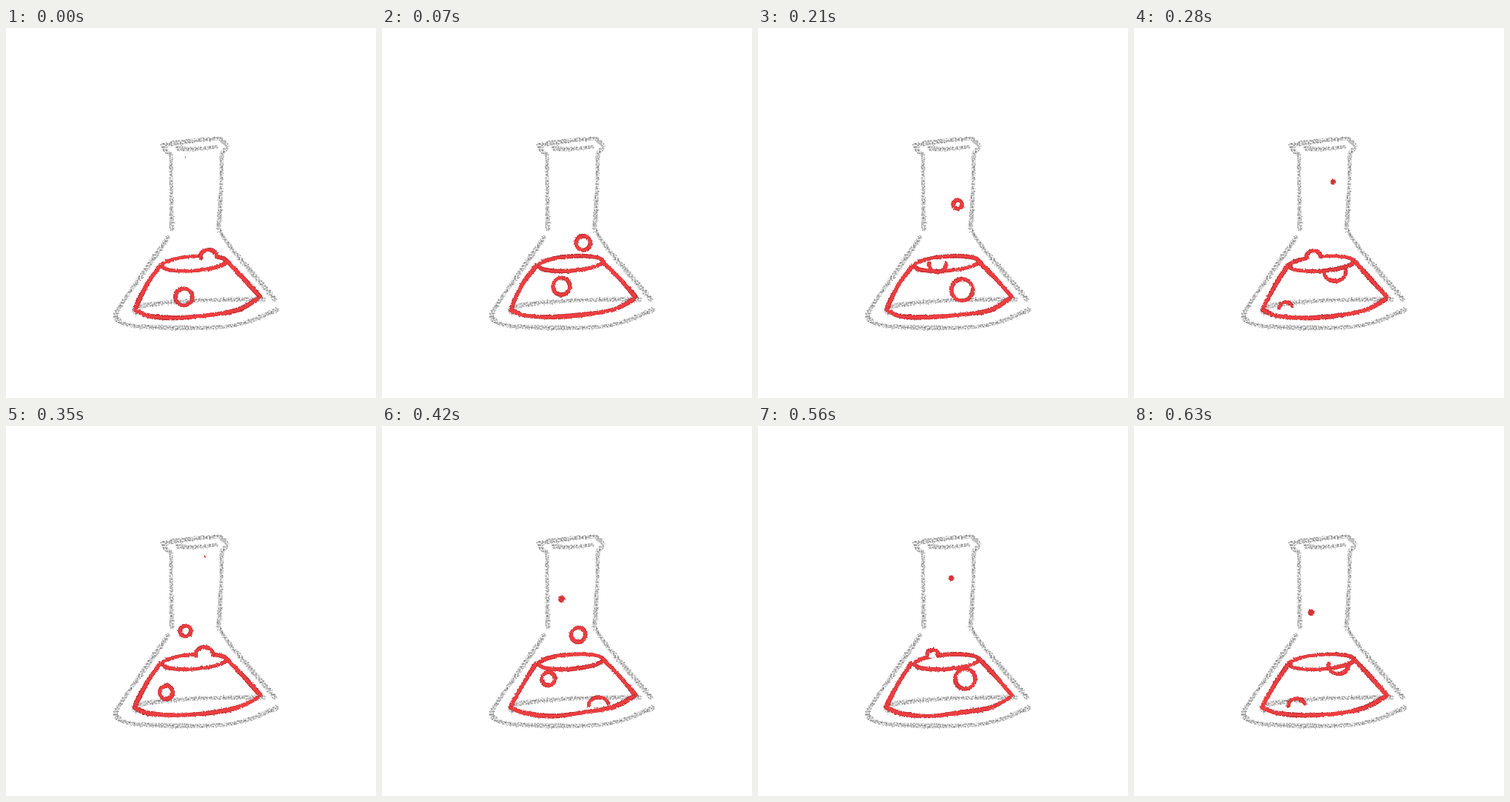
An HTML page that plays this animation: 480 by 480 pixels, repeating every 700 ms.

```html
<!DOCTYPE html>
<html lang="en">
<head>
<meta charset="utf-8">
<title>Bubbling flask</title>
<style>
  html, body { margin: 0; width: 100%; height: 100%; overflow: hidden; background: #fff; }
  svg { display: block; width: 100vw; height: 100vh; }
  path { fill: none; stroke-linecap: round; }
</style>
</head>
<body>
<svg viewBox="0 0 480 480">
  <defs>
    <filter id="pencil" filterUnits="userSpaceOnUse" x="130" y="130" width="235" height="270" color-interpolation-filters="sRGB">
      <feTurbulence type="fractalNoise" baseFrequency=".5" numOctaves="2" seed="4"/>
      <feColorMatrix values="1 0 0 0 0  0 1 0 0 0  0 0 1 0 0  0 0 0 0 1" result="noise"/>
      <feDisplacementMap in="SourceGraphic" in2="noise" scale="3.5" xChannelSelector="R" yChannelSelector="G" result="rough"/>
      <feColorMatrix in="noise" values="0 0 1.1 0 .22  0 0 1.1 0 .22  0 0 1.1 0 .22  0 0 0 0 1"/>
      <feComposite operator="in" in2="rough"/>
    </filter>
    <filter id="crayon" filterUnits="userSpaceOnUse" x="130" y="130" width="235" height="270" color-interpolation-filters="sRGB">
      <feTurbulence type="fractalNoise" baseFrequency=".45" numOctaves="2" seed="9"/>
      <feColorMatrix values="1 0 0 0 0  0 1 0 0 0  0 0 1 0 0  0 0 0 0 1" result="noise"/>
      <feDisplacementMap in="SourceGraphic" in2="noise" scale="3" xChannelSelector="R" yChannelSelector="G"/>
    </filter>
  </defs>
  <g id="glass" filter="url(#pencil)"></g>
  <g id="liquid" filter="url(#crayon)"></g>
</svg>
<script>
const STEP = 70, POSES = 10;
const SURFACE = 296, FLOOR = 363, RIM = 150;

let seed = 1;
const random = () => (seed = seed * 16807 % 2147483647) / 2147483647;
const jitter = size => (random() * 2 - 1) * size;
const lerp = (a, b, t) => a + (b - a) * t;
const parse = text => text.split(' ').map(pair => pair.split(',').map(Number));

// Catmull-Rom samples through a few key points
function smooth(pts, steps = 5) {
  const at = i => pts[Math.max(0, Math.min(pts.length - 1, i))];
  const out = [];
  for (let i = 0; i < pts.length - 1; i++) {
    const [a, b, c, d] = [at(i - 1), at(i), at(i + 1), at(i + 2)];
    for (let s = 0; s < steps; s++) {
      const t = s / steps;
      out.push(b.map((v, k) => v + t / 2 * (c[k] - a[k] +
        t * (2 * a[k] - 5 * v + 4 * c[k] - d[k] + t * (3 * (v - c[k]) + d[k] - a[k])))));
    }
  }
  return [...out, pts[pts.length - 1]];
}

// Each segment gets its own width, as from uneven hand pressure
function brush(pts, width, color) {
  const phase = random() * 6;
  return pts.slice(1).map((p, i) => {
    const w = Math.max(1, width + Math.sin(phase + i * .5) * .7);
    return `<path d="M${pts[i]}L${p}" stroke="${color}" stroke-width="${w}"/>`;
  }).join('');
}

const red = (pts, width) => brush(pts, width, '#bd3035') + brush(pts, width - 1.6, '#ee3e40');

function arc(x, y, rx, ry, from, to, width = 5, tilt = 0) {
  const pts = [];
  for (let i = 0; i <= 20; i++) {
    const a = lerp(from, to, i / 20) * Math.PI / 180;
    const dx = rx * Math.cos(a);
    pts.push([x + dx, y + ry * Math.sin(a) + dx * tilt]);
  }
  return red(pts, width);
}

const ellipse = (x, y, rx, ry, color) =>
  `<ellipse cx="${x}" cy="${y}" rx="${rx}" ry="${ry}" fill="${color}"/>`;

const wobbly = text => red(smooth(parse(text).map(p => p.map(v => v + jitter(1.2)))), 5.7);

function body() {
  const start = 170 + jitter(15);
  return arc(244 + jitter(1), 306 + jitter(.6), 42, 9.5, start, start + 352, 5, -.07) +
    wobbly('199,309 183,333 167,364') +
    wobbly('287,303 307,324 329,349') +
    wobbly('167,365 185,373 222,376 265,372 300,365 327,352');
}

// dive: poses from floor to surface; settle: how slowly x drifts to its end
const bubbles = [
  { birth: 9, dive: 5, x: 211, end: 233, settle: .1, r: 11, rise: 30 },
  { birth: 2, dive: 3, x: 270, end: 244, settle: .8, r: 14, rise: 25 },
  { birth: 6, dive: 4, x: 281, end: 257, settle: .7, r: 13, rise: 17 },
  { birth: 4, dive: 4, x: 197, end: 240, settle: .75, r: 8.5, rise: 54 }
];

function bubble({ birth, dive, x, end, settle, r, rise }, pose) {
  const age = (pose - birth + POSES) % POSES;
  const cx = lerp(end, x, settle ** age);
  if (age < dive) {
    const cy = lerp(FLOOR, SURFACE - 3, age / dive);
    if (age === 0) return arc(cx, cy, r, r * .85, 180, 345, 4.5);
    if (cy > 325) return arc(cx, cy, r, r, 0, 360);
    return arc(cx, cy, r, r * .85, -10, 190);
  }
  if (age === dive) {
    const size = r * .8;
    return ellipse(cx, SURFACE, size, size * .8, '#fff') + arc(cx, SURFACE, size, size * .8, 165, 365);
  }
  const cy = SURFACE - rise * (age - dive) ** 1.25;
  const size = r * .8 * (cy - RIM) / (SURFACE - RIM);
  if (size < .8) return '';
  return size < 5 ? ellipse(cx, cy, size, size, '#d63539') : arc(cx, cy, size, size, 0, 360);
}

const glass = [
  '204,152 235,147 277,143', '204,152 207,158 213,164', '214,166 215,260',
  '279,145 287,153 281,162', '280,164 279,205 276,259', '223,156 245,157 273,154',
  '210,272 180,315 152,355 142,373 152,383 175,387 240,389 300,385 351,366',
  '277,263 295,289 349,352', '169,371 168,363 200,357 260,353 334,352'
];
document.getElementById('glass').innerHTML =
  glass.map(line => brush(smooth(parse(line)), 5.3, '#aaa')).join('');

const liquid = document.getElementById('liquid');
let shown = -1;

function draw(time) {
  const pose = Math.floor(time / STEP) % POSES;
  if (pose === shown) return;
  shown = pose;
  seed = (pose + 1) * 91129337;
  liquid.innerHTML = body() + bubbles.map(b => bubble(b, pose)).join('');
}

const start = performance.now();
function tick() {
  draw(performance.now() - start);
  requestAnimationFrame(tick);
}
tick();
</script>
</body>
</html>
```
